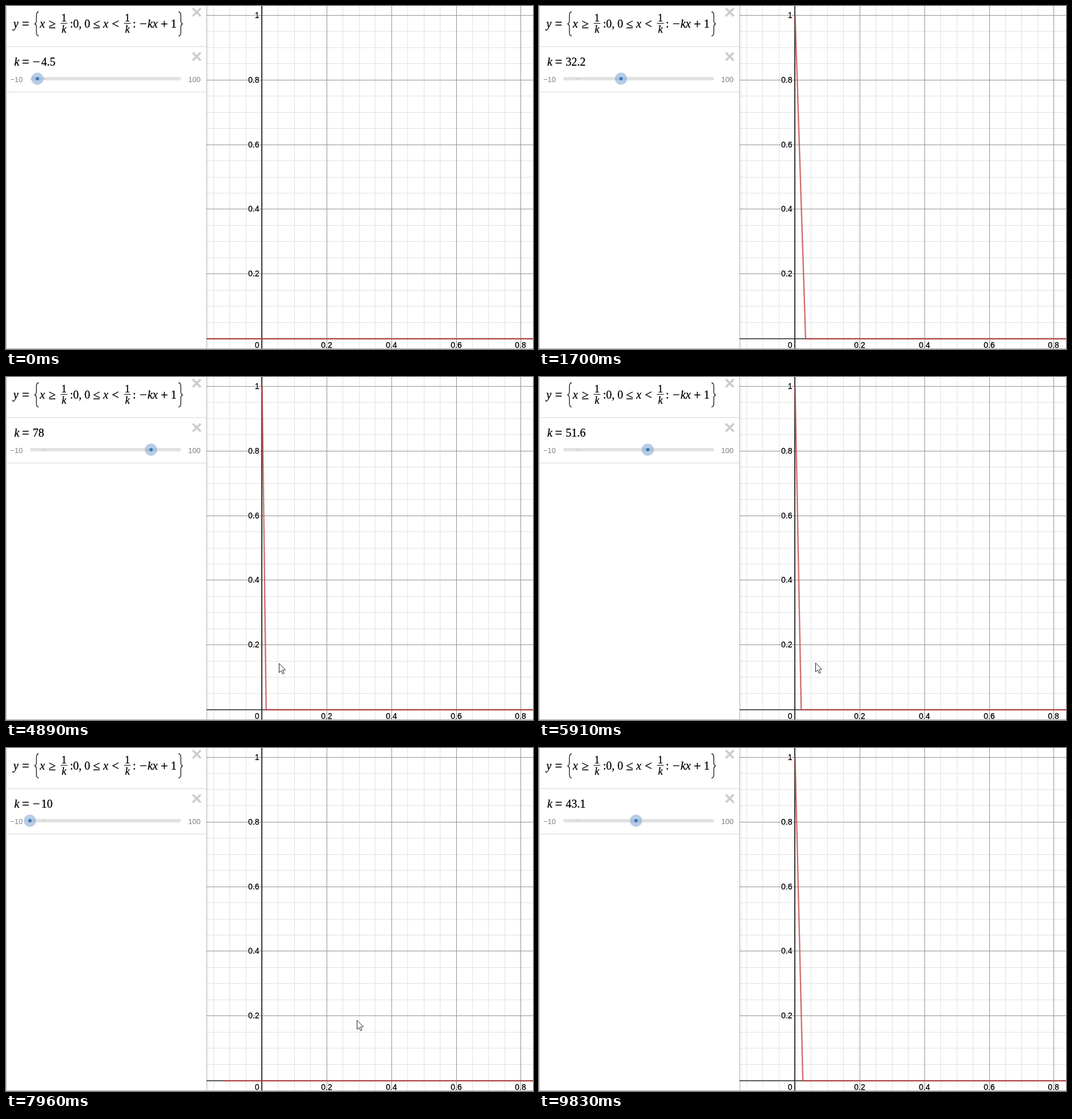
An HTML page with a canvas for the animation above (9.93 s loop, 927x604 px).

```html
<!DOCTYPE html>
<html lang="en">
<head>
<meta charset="utf-8">
<title>Ramp with slider</title>
<style>
  html, body { margin: 0; width: 100%; height: 100%; overflow: hidden; background: #fff; }
  canvas { display: block; width: 927px; height: 604px; }
</style>
</head>
<body>
<canvas id="stage" width="927" height="604"></canvas>
<script>
const ctx = document.getElementById('stage').getContext('2d');
const W = 927, H = 604, LOOP = 9930;
const LEFT = 353, OX = 450, OY = 585.15, AXIS_Y = 586, UNIT = 569.2;
const SERIF = '"Liberation Serif", "Times New Roman", serif';
const SANS = '"Liberation Sans", Arial, sans-serif';
const LAG = 50; // the plot trails the slider slightly

// The picture refreshes eight times in each of these stretches
const BEATS = [150, 1300, 2380, 3510, 4620, 5670, 6760, 7810, 8960, LOOP];

// Slider value bounces between -10 and 100
const K_KEYS = [[0, -4.5], [190, -10], [1705, 32.2], [4100, 100],
                [4882, 78], [6760, 24.4], [7954, -10], [9809, 43.1]];
const POINTER = [[3400, 470, 504], [4400, 480, 504], [5600, 480, 504],
                 [6760, 514, 500], [7954, 617, 479]];
const SHOW = 2900, HIDE = 8380;

function refreshTime(t) {
  t += 20;
  if (t < BEATS[0]) return 0;
  let i = 0;
  while (i < BEATS.length - 2 && BEATS[i + 1] <= t) i++;
  const step = (BEATS[i + 1] - BEATS[i]) / 8;
  return BEATS[i] + Math.min(7, Math.floor((t - BEATS[i]) / step)) * step;
}

function at(keys, t, col = 1) {
  const i = keys.findIndex(key => key[0] >= t);
  if (i < 0) return keys[keys.length - 1][col];
  if (i === 0) return keys[0][col];
  const a = keys[i - 1], b = keys[i];
  return a[col] + (b[col] - a[col]) * (t - a[0]) / (b[0] - a[0]);
}

function line(x1, y1, x2, y2, color, width = 1) {
  ctx.strokeStyle = color;
  ctx.lineWidth = width;
  ctx.beginPath();
  ctx.moveTo(x1, y1);
  ctx.lineTo(x2, y2);
  ctx.stroke();
}

function text(s, x, y, font, color = '#000', align = 'left', weight = 0.3) {
  ctx.font = font;
  ctx.fillStyle = ctx.strokeStyle = color;
  ctx.textAlign = align;
  ctx.fillText(s, x, y);
  if (weight) {
    ctx.lineWidth = weight;
    ctx.strokeText(s, x, y);
  }
}

const num = (s, x, y) => text(s, x, y, '20px ' + SERIF);
const ital = (s, x, y) => text(s, x, y, 'italic 20px ' + SERIF);
const op = (s, x, y) => text(s, x, y + 1, '23px ' + SERIF);

function disc(x, y, r, color) {
  ctx.fillStyle = color;
  ctx.beginPath();
  ctx.arc(x, y, r, 0, 7);
  ctx.fill();
}

function cross(x, y) {
  for (const d of [-7, 7]) line(x - 7, y - d, x + 7, y + d, '#ccc', 3.8);
}

function fraction(x) {
  text('1', x, 27, '18px ' + SERIF, '#000', 'center');
  text('k', x, 47, 'italic 18px ' + SERIF, '#000', 'center');
  line(x - 6, 30.5, x + 6, 30.5, '#000');
}

// dir 1 opens to the right, -1 to the left
function brace(x, dir) {
  ctx.strokeStyle = '#222';
  ctx.lineWidth = 1.4;
  ctx.beginPath();
  for (const side of [-1, 1]) {
    const y = d => 31.5 + side * d;
    ctx.moveTo(x + 4 * dir, y(21.5));
    ctx.quadraticCurveTo(x, y(20.5), x, y(15.5));
    ctx.lineTo(x, y(5.5));
    ctx.quadraticCurveTo(x, y(1), x - 3.5 * dir, y(0));
  }
  ctx.stroke();
}

function gridLabel(s, x, y, align) {
  ctx.font = '14px ' + SANS;
  ctx.textAlign = align;
  ctx.strokeStyle = '#fff';
  ctx.lineWidth = 3;
  ctx.lineJoin = 'round';
  ctx.strokeText(s, x, y);
  text(s, x, y, ctx.font, '#000', align);
}

function grid() {
  const step = UNIT / 20;
  for (const major of [false, true]) {
    const color = major ? '#929292' : '#e1e1e1';
    for (let i = -3; i <= 20; i++) {
      if ((i % 4 === 0) !== major) continue;
      const x = Math.round(OX + i * step) + 0.5;
      const y = Math.round(OY - i * step) + 0.5;
      line(x, 0, x, H, color);
      line(LEFT, y, W, y, color);
    }
  }
  line(OX, 0, OX, H, '#333', 2);
  line(LEFT, AXIS_Y, W, AXIS_Y, '#333', 1.6);
  gridLabel('0', 445.5, 602, 'right');
  for (let i = 1; i <= 5; i++) {
    const s = String(i / 5), d = i * UNIT / 5;
    gridLabel(s, 445.5, Math.round(OY - d) + 5, 'right');
    if (i < 5) gridLabel(s, Math.round(OX + d), 602, 'center');
  }
}

function plot(k) {
  const x0 = OX + 0.5, edge = k ? x0 + UNIT / k : W + 9;
  ctx.save();
  ctx.beginPath();
  ctx.rect(LEFT, 0, W - LEFT, H);
  ctx.clip();
  ctx.strokeStyle = 'rgba(199, 68, 64, 0.78)';
  ctx.lineWidth = 2.4;
  ctx.lineJoin = 'round';
  ctx.beginPath();
  if (k > 0) {
    ctx.moveTo(x0, AXIS_Y - UNIT);
    ctx.lineTo(edge, AXIS_Y);
  } else {
    ctx.moveTo(Math.max(edge, LEFT - 5), AXIS_Y);
  }
  ctx.lineTo(Math.max(W + 5, edge), AXIS_Y);
  ctx.stroke();
  ctx.restore();
}

function formula() {
  ital('y', 13, 38);
  op('=', 28, 38);
  brace(53.5, 1);
  ital('x', 59.5, 38);
  op('≥', 75, 38);
  fraction(102);
  num(':0,', 112.5, 38);
  num('0', 138, 38);
  op('≤', 153, 38);
  ital('x', 171, 38);
  op('<', 186, 38);
  fraction(213.5);
  num(':', 223, 38);
  op('−', 235, 38);
  ital('kx', 249, 38);
  op('+', 272, 38);
  num('1', 290, 38);
  brace(307.5, -1);
}

function slider(k) {
  const value = Math.round(k * 10) / 10;
  ital('k', 14.5, 105);
  op('=', 28, 105);
  if (value < 0) op('−', 47, 105);
  num(String(Math.abs(value)), value < 0 ? 62 : 47, 105);

  text('−10', 7.5, 134, '13px ' + SANS, '#808080', 'left', 0);
  text('100', 320.5, 134, '13px ' + SANS, '#808080', 'left', 0);
  ctx.lineCap = 'round';
  line(45.5, 128, 305, 128, '#e2e2e2', 6);
  ctx.lineCap = 'butt';
  disc(67.5, 128, 1, '#b5b5b5');
  const x = 42 + (k + 10) / 110 * 266.5;
  disc(x, 128, 10.7, 'rgba(135, 170, 214, 0.6)');
  disc(x, 128, 3, '#3c78b4');
}

function panel(k) {
  ctx.fillStyle = '#fff';
  ctx.fillRect(0, 0, 352, H);
  const shade = ctx.createLinearGradient(352, 0, 357, 0);
  shade.addColorStop(0, 'rgba(0, 0, 0, 0.14)');
  shade.addColorStop(1, 'rgba(0, 0, 0, 0)');
  ctx.fillStyle = shade;
  ctx.fillRect(352, 0, 5, H);
  line(352.5, 0, 352.5, H, '#ccc');
  line(0.5, 0, 0.5, H, '#b4b4b4');
  for (const y of [71.5, 151.5]) line(0, y, 352, y, '#d6d6d6');
  for (const y of [11, 89]) cross(335.5, y);
  formula();
  slider(k);
}

function pointer(x, y) {
  ctx.beginPath();
  const shape = [[0, 0], [0, 16], [3.7, 12.6], [6.2, 18.3], [8.7, 17.2], [6.2, 11.6], [11, 11.3]];
  for (const [dx, dy] of shape) ctx.lineTo(x + 0.5 + dx, y + 0.5 + dy);
  ctx.closePath();
  ctx.fillStyle = '#fff';
  ctx.fill();
  ctx.strokeStyle = '#222';
  ctx.lineWidth = 1;
  ctx.lineJoin = 'miter';
  ctx.stroke();
}

function draw(t) {
  ctx.fillStyle = '#fff';
  ctx.fillRect(0, 0, W, H);
  grid();
  plot(at(K_KEYS, t - LAG));
  panel(at(K_KEYS, t));
  line(0, 603.5, W, 603.5, '#a8a8a8');
  if (t >= SHOW && t <= HIDE)
    pointer(Math.round(at(POINTER, t)), Math.round(at(POINTER, t, 2)));
}

const start = performance.now();
function frame(now) {
  draw(refreshTime(Math.max(0, now - start) % LOOP));
  requestAnimationFrame(frame);
}
draw(0);
requestAnimationFrame(frame);
</script>
</body>
</html>
```
